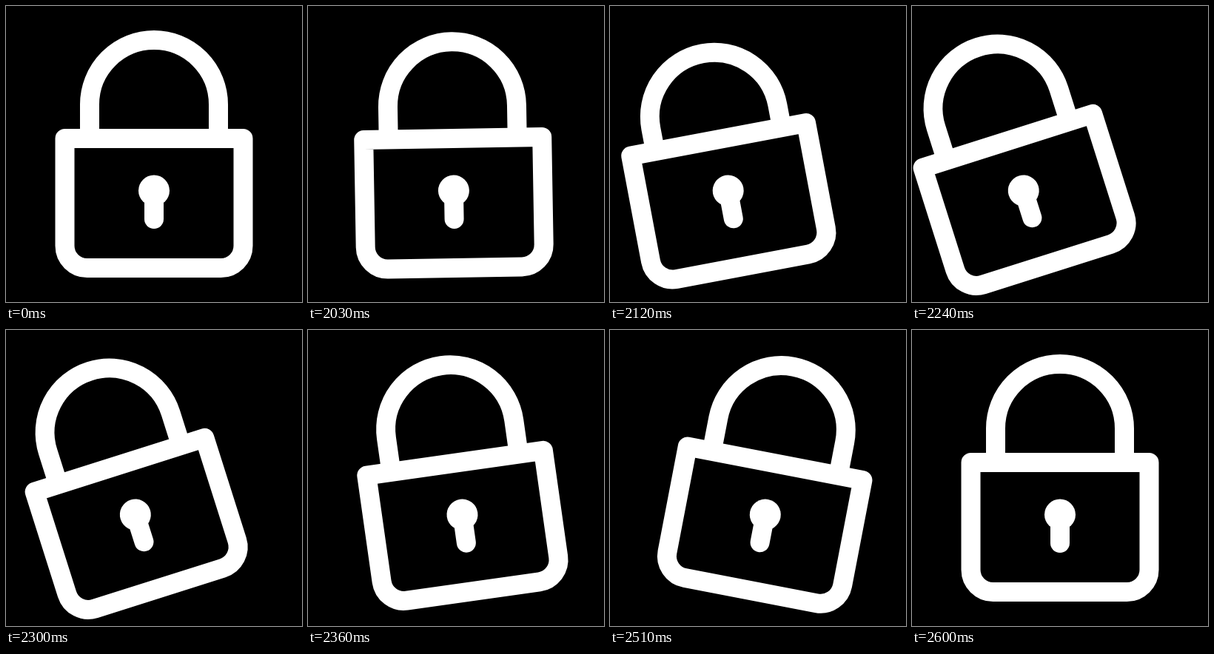
These frames come from a looping animation (400 by 400 pixels, 2630 ms). An HTML page:

```html
<!DOCTYPE html>
<html>
<head>
<meta charset="utf-8">
<style>
  html, body { margin: 0; width: 100%; height: 100%; overflow: hidden; background: #000; }
  svg { display: block; width: 100%; height: 100%; }
</style>
</head>
<body>
<svg viewBox="0 0 400 400">
  <g id="lock" fill="none" stroke="#fff" stroke-width="26" stroke-linejoin="round">
    <path id="shackle" d="M113 172V133a87 87 0 0 1 174 0V172"/>
    <path d="M79.5 179H320.5V324a30 30 0 0 1 -30 30H109.5a30 30 0 0 1 -30 -30Z"/>
    <path d="M200 250V288" stroke-linecap="round"/>
    <circle cx="200" cy="249.5" r="21" fill="#fff" stroke="none"/>
  </g>
</svg>
<script>
  const LOOP = 2630, REST = 2000, STEP = 30;
  const lock = document.getElementById('lock');
  const shackle = document.getElementById('shackle');

  // Each move is [start step, end step, change in value]
  const slide = [[0.2, 5.5, -50], [7.6, 13.6, 71], [13.8, 19.9, -21]];
  const tilt = [[0, 7, -17.6], [10.2, 14.9, 29.1], [16.5, 20, -11.5]];
  const dip = [[0, 4, 15], [4, 8, -15]];

  function ease(x) {
    x = Math.min(1, Math.max(0, x));
    return x * x * (3 - 2 * x);
  }

  function valueAt(moves, n) {
    return moves.reduce((sum, [a, b, d]) => sum + d * ease((n - a) / (b - a)), 0);
  }

  const start = performance.now();

  function draw() {
    const t = (performance.now() - start) % LOOP;
    const n = Math.max(0, Math.floor((t - REST) / STEP));
    lock.setAttribute('transform',
      `translate(${valueAt(slide, n)}) rotate(${valueAt(tilt, n)} 200 250)`);
    shackle.setAttribute('transform', `translate(0 ${valueAt(dip, n)})`);
    requestAnimationFrame(draw);
  }
  draw();
</script>
</body>
</html>
```
